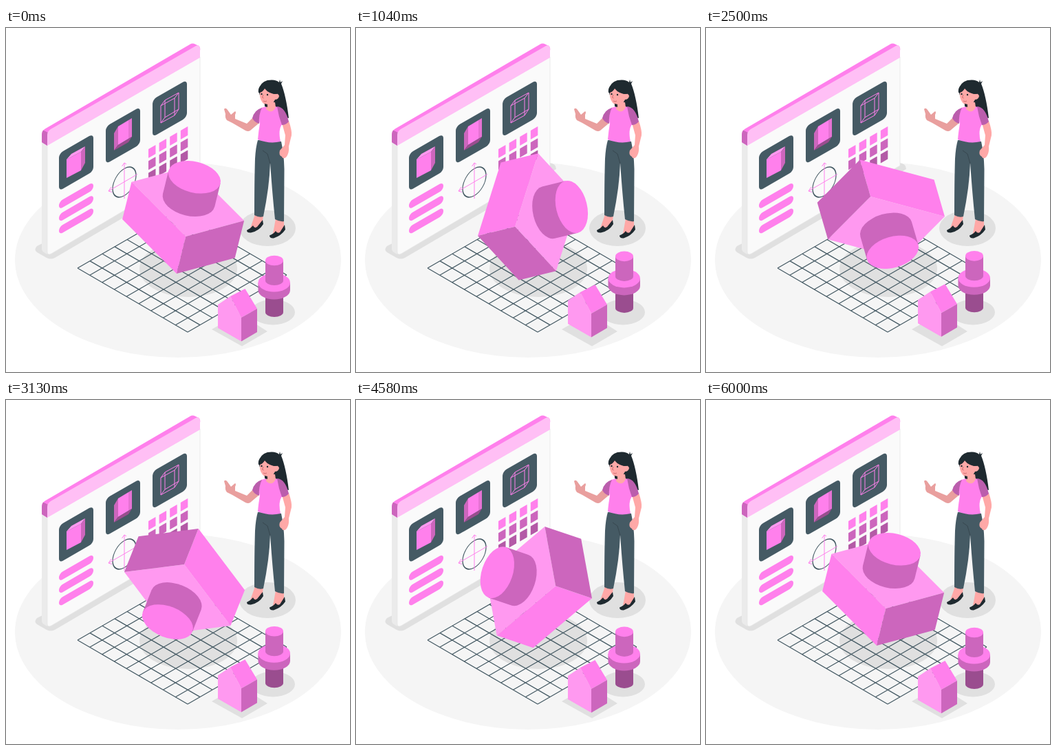
An HTML page for the animation above (6.04 s loop, 500 by 500 pixels).

```html
<!DOCTYPE html>
<html lang="en">
<head>
<meta charset="utf-8">
<title>3D modeling</title>
<style>
html, body { margin: 0; width: 100%; height: 100%; overflow: hidden; background: #fff; }
svg { display: block; width: 100%; height: 100%; }
.pink { fill: #ff80ec; }
.light { fill: #ff99f0; }
.deep { fill: #cc66bd; }
.plum { fill: #b35aa6; }
.dark { fill: #9a4d8f; }
.slate { fill: #455a64; }
.hair { fill: #1f2a30; }
.skin { fill: #ffa8a7; }
.arm { fill: #e99f9e; }
.shade { fill: #e0e0e0; }
.line { fill: none; stroke: #455a64; stroke-width: 1.25; }
.wire { fill: none; stroke: #ff80ec; stroke-width: 1; stroke-linejoin: round; }
</style>
</head>
<body>
<svg viewBox="0 0 500 500">
  <ellipse cx="250" cy="337" rx="237" ry="142" fill="#f5f5f5"/>

  <!-- floor shadows and grid -->
  <path class="shade" d="M45 317L281 196Q291 197 291 205L71 334Q65 337 59 334L45 326Q40 322 45 317Z"/>
  <ellipse class="shade" cx="265" cy="350" rx="71" ry="41"/>
  <ellipse class="shade" cx="380" cy="291" rx="41" ry="26"/>
  <ellipse class="shade" cx="388" cy="413" rx="32" ry="18.500"/>
  <path class="shade" d="M299 438L339 415L380 441L343 462.500Z"/>
  <path id="floor" class="line"/>

  <!-- window -->
  <path fill="#ebebeb" d="M52 163L60 168V329L55 326Q52 324 52 320Z"/>
  <path fill="#fafafa" stroke="#e6e6e6" stroke-width=".8" d="M60 170L282 42V200L66 328Q60 331 60 325Z"/>
  <path class="pink" d="M52 155Q52 150 56 147L267 24Q271 21.500 275 23.500L280 26Q283 28 282 33L60 160V171L52 166Z"/>
  <path class="deep" d="M52 155Q52 151 54 148.500L61 152Q60 154 60 157V171L52 166Z"/>
  <path fill="#ffbff5" d="M60 171V156Q60 150 65 147L276 26Q282 23 282 31V43Z"/>
  <g id="panel"></g>

  <!-- icons -->
  <path class="pink" d="M88 191L109 180V207L88 218Z"/>
  <path class="light" d="M88 191L95 183L115 172L109 180Z"/>
  <path class="deep" d="M109 180L115 172V196L109 207Z"/>
  <path class="pink" d="M163 143L178 134V161L163 170Z"/>
  <path fill="#e673d4" d="M178 134L183 131V158L178 161Z"/>
  <path class="deep" d="M163 143V170L157 178V153Z"/>
  <path class="dark" d="M163 170L183 158L178 166L157 178Z"/>
  <path class="wire" d="M225 113L245 102V127L225 138ZM231 105L251 94V118L231 130ZM225 113L231 105M245 102L251 94M245 127L251 118M225 138L231 130"/>
  <ellipse class="line" rx="17" ry="19.600" transform="matrix(1 -.577 0 1 172 224)"/>
  <path class="wire" d="M172 196V248M149 237L191 212.500M168.500 201L172 196L175 198M153 231L149 237L154 238.500"/>

  <!-- woman -->
  <path class="skin" d="M362 271H374L373 281Q366 292 357 293L355 291ZM392 277H404V288Q399 299 390 301L388 299Z"/>
  <path class="hair" d="M350 294Q356 291 359 287Q361 292 365 289L373 279L374 285Q368 295 356 297.500Q350 298 350 294ZM383 301.500Q389 299 392 295Q394 299 398 297L405 286L406 293Q400 302 389 305.500Q383 306 383 301.500Z"/>
  <path class="slate" d="M366 163L400 165Q404 183 404.500 205L404 281Q398 282 391 278Q387 240 384 196Q383 230 374 274Q368 276 361 272Q361 222 362 190Q363 173 366 163Z"/>
  <path fill="none" stroke="#37474f" d="M384 197L380 183L373 178"/>
  <path class="hair" d="M367 91Q369 79 380 76Q392 74 397 79L398 75L399 79L402 77L400 81Q407 98 411 131Q402 131 394 116L378 116Q375 107 369 98Z"/>
  <path class="arm" d="M359 130L368 138L355 149Q352 151 348 149L329 138L321 134Q318 130 319 125L317 118Q319 115 322 119L327 126L333 121Q335 122 333 126V132L350 139Z"/>
  <path class="skin" d="M401 138L411 135Q416 150 415 156L411 172Q412 182 407 188Q402 191 401 187Q396 185 398 178L405 170L406 156Z"/>
  <path class="pink" d="M371 116L379 114Q386 120 392 114L402 118Q407 128 402 139Q395 147 399 165Q383 169 366 162Q367 150 369 139Q364 126 371 116Z"/>
  <path fill="#bb5ead" d="M372 116Q361 119 358 131Q361 137 368 139Q367 126 372 116ZM394 114Q406 115 411 136Q407 141 401 141Q396 128 394 114Z"/>
  <path class="skin" d="M379 108H391L392 115Q387 126 378 118Z"/>
  <path class="skin" d="M369 93Q373 92 376 87Q383 95 390 96Q396 94 397 99Q396 104 391 104Q388 112 378 112Q371 109 369 100Z"/>
  <path class="hair" d="M367 94Q366 87 371 83Q378 78 390 84L394 96Q382 96 376 88Q373 93 369 94ZM376 110L380 111V115L376 114Z"/>
  <circle class="hair" cx="371.500" cy="96" r="1.200"/>
  <circle class="hair" cx="380" cy="97" r="1.200"/>
  <path fill="none" stroke="#c45d64" stroke-width=".8" d="M374 97L372.500 101L374.500 102M374 106Q377 108 379 106"/>

  <!-- spinning block, drawn around its pivot -->
  <g id="block">
    <path class="light" d="M3 32L-75 -48L10 -70L88 10Z"/>
    <path class="pink" d="M3 32L-75 -48L-89 6L-11 86Z"/>
    <path class="deep" d="M3 32L88 10L74 64L-11 86Z"/>
    <g transform="translate(16.500 -54) rotate(14.500)">
      <path class="deep" d="M-38.800 0H38.800V34.500A38.800 22.500 0 0 1 -38.800 34.500Z"/>
      <ellipse class="pink" rx="38.800" ry="22.500"/>
    </g>
  </g>

  <!-- floating bolt and house -->
  <g id="float">
    <path class="dark" d="M377 385H403V413A13 7 0 0 1 377 413Z"/>
    <path class="deep" d="M366.500 370H413V381A23.250 13.500 0 0 1 366.500 381Z"/>
    <ellipse class="pink" cx="389.750" cy="370" rx="23.250" ry="13.500"/>
    <path class="deep" d="M377 338H403V367A13 7 0 0 1 377 367Z"/>
    <ellipse class="pink" cx="390" cy="338" rx="13" ry="7.300"/>
    <path class="light" d="M308 402L326 390L342 421V455.500L308 436Z"/>
    <path class="pink" d="M326 390L347.500 379L365 408L342 421Z"/>
    <path class="deep" d="M342 421L365 408V442L342 455.500Z"/>
  </g>
</svg>
<script>
const LOOP = 6040, SPIN = 6000, FLOAT = 1500, RISE = 10, START = -.7, SLOPE = .577;
const byId = id => document.getElementById(id);

// Rectangle lying in the plane of the window
const tile = (x, y, w, h, r, cls) =>
  `<rect class="${cls}" width="${w}" height="${h}" rx="${r}" transform="matrix(1 ${-SLOPE} 0 1 ${x} ${y})"/>`;

let panel = '';
['pink', 'deep', 'plum'].forEach((tone, i) => {
  panel += tile(77 + 68 * i, 182.5 - 68 * SLOPE * i, 50, 54.5, 6, 'slate');
  panel += tile(77, 252.5 + 18.3 * i, 50, 11.5, 5.5, 'pink');
  for (let j = 0; j < 4; j++)
    panel += tile(207 + 15.6 * j, 176 + 17.3 * i - 9 * j, 10.5, 13, .5, tone);
});
byId('panel').innerHTML = panel;

const floorAt = (u, v) => `${104 + 160 * u + 144 * v} ${349 + 93 * u - 83 * v}`;
let lines = '';
for (let i = 0; i <= 9; i++) lines += `M${floorAt(i / 9, 0)}L${floorAt(i / 9, 1)}`;
for (let i = 0; i <= 8; i++) lines += `M${floorAt(0, i / 8)}L${floorAt(1, i / 8)}`;
byId('floor').setAttribute('d', lines);

const block = byId('block'), floater = byId('float');
function draw() {
  const t = performance.now() % LOOP;
  const phase = t % FLOAT / FLOAT;
  const lift = RISE * (1 - Math.abs(2 * phase - 1));
  block.setAttribute('transform', `translate(258 271) rotate(${START + 360 * t / SPIN})`);
  floater.setAttribute('transform', `translate(0 ${-lift})`);
  requestAnimationFrame(draw);
}
draw();
</script>
</body>
</html>
```
